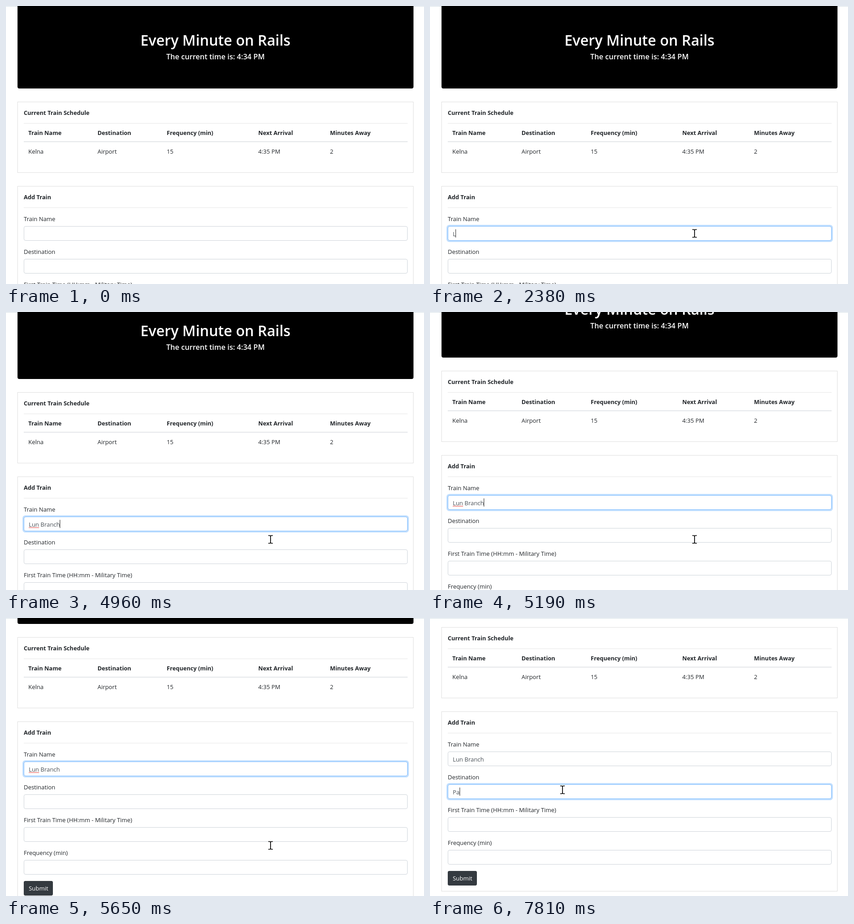
An HTML page that plays this animation: 918 by 610 pixels, repeating every 8 s.

```html
<!DOCTYPE html>
<html lang="en">
<head>
<meta charset="utf-8">
<title>Train schedule</title>
<style>
  html, body { margin: 0; width: 100%; height: 100%; overflow: hidden; background: #fff; }
  svg { display: block; width: 918px; height: 610px; }
  text { font: 12.9px "Open Sans", sans-serif; fill: #212529; white-space: pre; }
  .bold { font-weight: 700; font-size: 12.65px; }
  .title { font-weight: 600; font-size: 31.8px; fill: #fff; text-anchor: middle; }
  .clock { font-weight: 600; font-size: 16.1px; fill: #fff; text-anchor: middle; }
  .typed { fill: #495057; }
  .light { fill: #fff; }
  .card { fill: #fff; stroke: #dfdfdf; }
  .field { fill: #fff; stroke: #ced4da; }
  .glow { fill: none; stroke: #bfdeff; stroke-width: 2.8; }
  .ring { fill: none; stroke: #80bdff; }
  .wave { fill: none; stroke: #e53935; }
</style>
</head>
<body>
<svg viewBox="0 0 918 610">
  <rect width="918" height="1" fill="#d3dde4"/>
  <g id="page"></g>
  <path id="beam" d="M-5-8.5h3.5l1.5 1 1.5-1H5M0-8V8M-5 8.5h3.5l1.5-1 1.5 1H5" fill="none" stroke="#000" stroke-width="1.7"/>
  <path id="arrow" d="M.5.5V15.5L4 12.2 6.3 17 8.4 16 6.2 11.3H11Z" fill="#fff" stroke="#000"/>
</svg>
<script>
const LOOP = 8000, STEP = 76.5, BLINK = 545;
const SCROLL_START = 4810, RETURN_START = 6040;
const $ = id => document.getElementById(id);
const page = $('page');

function add(tag, attrs, parent = page) {
  const el = document.createElementNS('http://www.w3.org/2000/svg', tag);
  for (const key in attrs) el.setAttribute(key, attrs[key]);
  parent.appendChild(el);
  return el;
}
function label(x, y, str, cls = '') {
  const el = add('text', { x, y, class: cls });
  el.textContent = str;
  return el;
}
const box = (cls, x, y, width, height, rx = 0, parent = page) =>
  add('rect', { class: cls, x, y, width, height, rx }, parent);
const rule = (y, height, fill) => add('rect', { x: 39, y, width: 843, height, fill });

// Header and schedule
add('rect', { x: 25.3, y: -40, width: 869.6, height: 221, rx: 4 });
label(460, 87, 'Every Minute on Rails', 'title');
label(460, 116.5, 'The current time is: 4:34 PM', 'clock');
box('card', 25.5, 210.5, 869, 155);
label(39, 239, 'Current Train Schedule', 'bold');
rule(257, 1, '#e7e7e7');
const columns = [
  [49, 'Train Name', 'Kelna'],
  [201, 'Destination', 'Airport'],
  [353, 'Frequency (min)', '15'],
  [554, 'Next Arrival', '4:35 PM'],
  [711.5, 'Minutes Away', '2']
];
for (const [x, head, cell] of columns) {
  label(x, 283, head, 'bold');
  label(x, 324, cell);
}
rule(297, 1.4, '#d9dde1');

// Form
box('card', 25.5, 395.5, 869, 394);
label(39, 424, 'Add Train', 'bold');
rule(442, 1, '#e7e7e7');
const names = ['Train Name', 'Destination', 'First Train Time (HH:mm - Military Time)', 'Frequency (min)'];
const fields = names.map((name, i) => {
  const top = Math.round(482.6 + 72.2 * i);
  label(39, Math.round(471.6 + 72.2 * i), name);
  box('field', 39.5, top + .5, 842, 31, 3.4);
  const focus = add('g', { opacity: 0 });
  box('glow', 37.6, top - 1.4, 845.8, 34.8, 5, focus);
  box('ring', 39.5, top + .5, 842, 31, 3.4, focus);
  return { top, focus, text: label(50, top + 22, '', 'typed') };
});
add('rect', { x: 39, y: 745, width: 64, height: 32, rx: 3.4, fill: '#343a40' });
label(50, 766, 'Submit', 'light');
const caret = add('rect', { width: 1, height: 18, fill: '#222' });
const wave = add('path', { class: 'wave' });

const entries = [
  { str: 'Lun Branch', keys: [2380, 2550, 2600, 2850, 3080, 3310, 3380, 3550, 3630, 3780], on: 1370, off: 7030 },
  { str: 'Pa', keys: [7580, 7810], on: 7030, off: LOOP + 999 }
];

// Each key is [step, ...values]; values run straight between keys.
const scrollKeys = [[-1, 0], [0, 4], [1, 16], [2, 34], [7, 113], [11, 168], [12, 179], [13, 187], [14, 190]];
const enterKeys = [[0, 793, 584], [2, 765, 572], [4, 715, 545], [6, 655, 518], [8, 615, 504], [10, 600, 500], [12, 581, 499]];
const returnKeys = [[-1, 581, 499], [0, 600, 499], [2, 760, 497], [3, 855, 480], [4, 850, 462], [6, 640, 420], [8, 400, 385], [10, 296, 375], [12, 291, 377]];

const clamp = v => Math.min(1, Math.max(0, v));
const stepAt = (t, start) => Math.floor((t - start + 6) / STEP);

function along(keys, k) {
  let i = 0;
  while (i < keys.length - 2 && k >= keys[i + 1][0]) i++;
  const a = keys[i], b = keys[i + 1], u = clamp((k - a[0]) / (b[0] - a[0]));
  return a.slice(1).map((v, j) => v + (b[j + 1] - v) * u);
}

function drawEntry({ str, keys, on, off }, { top, focus, text }, t) {
  const count = keys.filter(k => t >= k).length;
  const shown = str.slice(0, count);
  if (text.textContent !== shown) text.textContent = shown;
  focus.setAttribute('opacity', clamp((t - on + 40) / 150) * (t >= on) * (1 - clamp((t - off) / 150)));
  if (t < on || t >= off) return;
  const since = t - (count ? keys[count - 1] : on);
  caret.setAttribute('x', Math.round(50 + (count ? text.getComputedTextLength() : 0) - .4));
  caret.setAttribute('y', top + 7);
  caret.style.display = Math.floor(since / BLINK) % 2 ? 'none' : '';
}

function drawWave(t) {
  const visible = t >= entries[0].keys[3] && t < entries[0].off;
  wave.style.display = visible ? '' : 'none';
  if (!visible) return;
  const end = 50 + fields[0].text.getSubStringLength(0, 3);
  let d = 'M50 508';
  for (let x = 51.5, up = 1; x <= end; x += 1.5, up = !up) d += `L${x} ${up ? 506.3 : 508}`;
  wave.setAttribute('d', d);
}

function drawPointer(t, scroll) {
  const back = t >= RETURN_START;
  const [x, y] = back ? along(returnKeys, stepAt(t, RETURN_START)) : along(enterKeys, stepAt(t, 280));
  // The shape only updates while the mouse moves, not while scrolling.
  const pageY = y + (back ? scroll : 0);
  const inField = fields.some(f => pageY >= f.top && pageY < f.top + 32);
  for (const [id, on] of [['beam', inField], ['arrow', !inField]]) {
    $(id).setAttribute('transform', `translate(${Math.round(x)} ${Math.round(y)})`);
    $(id).style.display = on && t >= 280 ? '' : 'none';
  }
}

function draw(t) {
  const scroll = Math.round(along(scrollKeys, stepAt(t, SCROLL_START))[0]);
  page.setAttribute('transform', `translate(0 ${-scroll})`);
  caret.style.display = 'none';
  entries.forEach((entry, i) => drawEntry(entry, fields[i], t));
  drawWave(t);
  drawPointer(t, scroll);
}

const began = performance.now();
function tick() {
  draw((performance.now() - began) % LOOP);
  requestAnimationFrame(tick);
}
tick();
</script>
</body>
</html>
```
